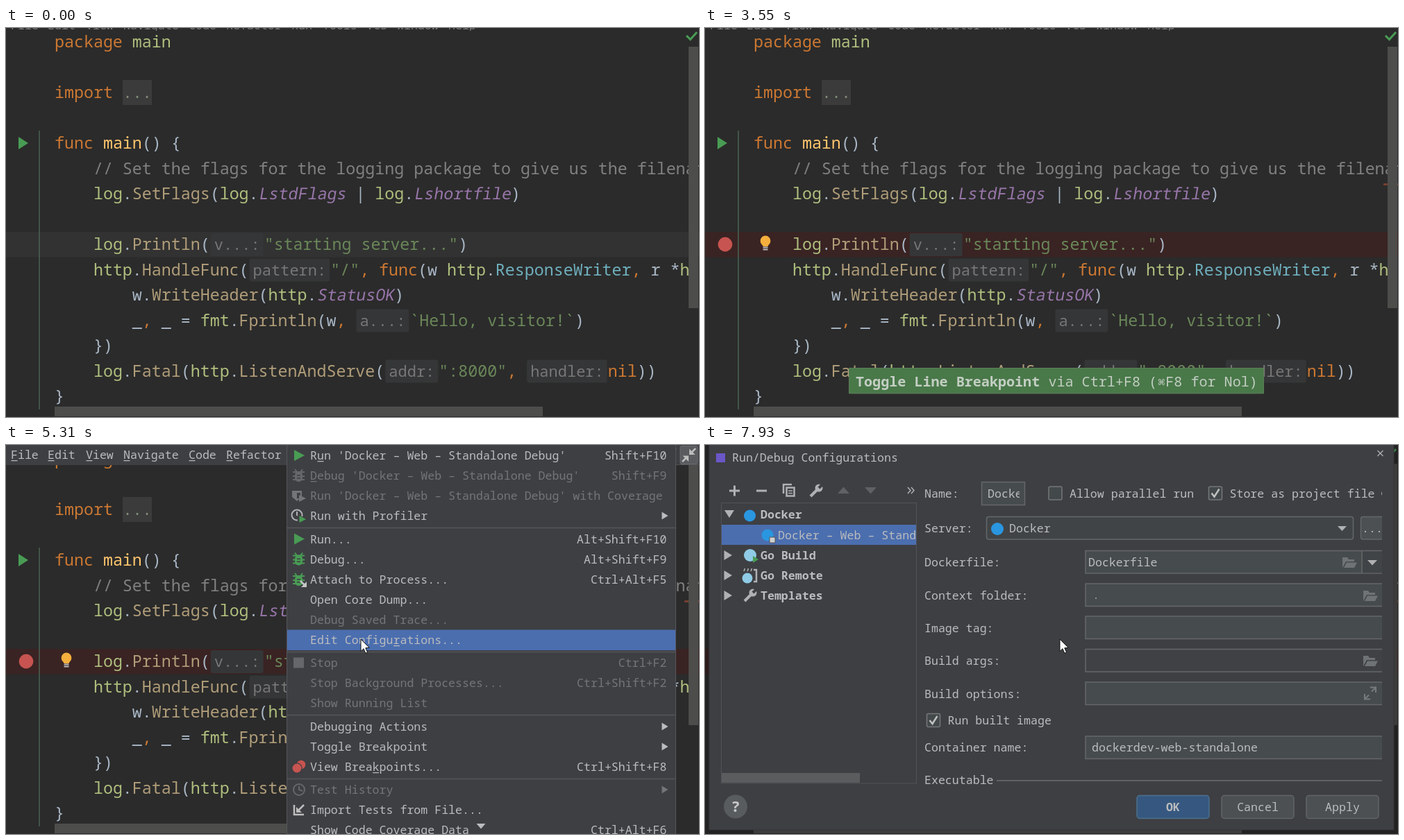
An HTML page with a canvas that plays this animation: 998 by 561 pixels, repeating every 8 s.

```html
<!DOCTYPE html>
<html lang="en">
<head>
<meta charset="utf-8">
<title>Editor breakpoint</title>
<style>
html, body { margin: 0; width: 100%; height: 100%; overflow: hidden; background: #2b2b2b; }
canvas { display: block; width: 998px; height: 561px; }
</style>
</head>
<body>
<canvas id="stage" width="998" height="561"></canvas>
<script>
const W = 998, H = 561, LOOP = 8000;
const g = document.getElementById('stage').getContext('2d');
const MONO = '"Noto Sans Mono", "DejaVu Sans Mono", monospace';
const PANEL = '#3e3f43', TEXT = '#bbbcbe', DIM = '#747579', BLUE = '#4b6eaf', GREEN = '#499c54';
const UI = 16.6, UI_ADV = UI * 0.6;
const CODE = 23.3, CODE_ADV = CODE * 0.6;
const HINT = 22, TIP = 20.1;

const clamp = v => Math.max(0, Math.min(1, v));
const span = (t, a, b) => clamp((t - a) / (b - a));
const ease = u => u * u * (3 - 2 * u);

function rect(x0, y0, x1, y1, fill, r = 0) {
  g.fillStyle = fill;
  g.beginPath();
  g.roundRect(x0, y0, x1 - x0, y1 - y0, r);
  g.fill();
}
function frame(x0, y0, x1, y1, fill, stroke, r = 0, lw = 1.5) {
  rect(x0, y0, x1, y1, fill, r);
  g.strokeStyle = stroke;
  g.lineWidth = lw;
  g.stroke();
}
function poly(color, ...p) {
  g.fillStyle = color;
  g.beginPath();
  for (let i = 0; i < p.length; i += 2) g.lineTo(p[i], p[i + 1]);
  g.closePath();
  g.fill();
}
function line(color, lw, ...p) {
  g.strokeStyle = color;
  g.lineWidth = lw;
  g.beginPath();
  for (let i = 0; i < p.length; i += 2) g.lineTo(p[i], p[i + 1]);
  g.stroke();
}
function disc(x, y, r, color) {
  g.fillStyle = color;
  g.beginPath();
  g.arc(x, y, r, 0, 7);
  g.fill();
}
function ring(x, y, r, color, lw = 2) {
  g.strokeStyle = color;
  g.lineWidth = lw;
  g.beginPath();
  g.arc(x, y, r, 0, 7);
  g.stroke();
}
function text(s, x, y, color = TEXT, size = UI, style = '', align = 'left') {
  g.font = `${style} ${size}px ${MONO}`;
  g.textAlign = align;
  g.fillStyle = color;
  g.fillText(s, x, y);
}
// The mono font has no italic, so lean it slightly.
function slanted(s, x, y, color, size) {
  g.save();
  g.transform(1, 0, -0.17, 1, x, y);
  text(s, 0, 0, color, size);
  g.restore();
}
function clipped(x0, y0, x1, y1, draw) {
  g.save();
  g.beginPath();
  g.rect(x0, y0, x1 - x0, y1 - y0);
  g.clip();
  draw();
  g.restore();
}

// ---- editor ----
const INK = {
  k: '#cc7832', d: '#ffc66d', p: '#afbf7e', f: '#b09d79', c: '#9876aa',
  s: '#6a8759', n: '#808080', t: '#6fafbd', o: '#a9b7c6'
};
// Each row: line number, indent in columns, then kind/text pairs; 'h' is an inlay hint.
const SOURCE = [
  [0, 0, 'k', 'package', 'p', ' main'],
  [2, 0, 'k', 'import'],
  [4, 0, 'k', 'func', 'd', ' main', 'o', '() {'],
  [5, 4, 'n', '// Set the flags for the logging package to give us the filename'],
  [6, 4, 'p', 'log', 'o', '.', 'f', 'SetFlags', 'o', '(', 'p', 'log', 'o', '.', 'c', 'LstdFlags',
    'o', ' | ', 'p', 'log', 'o', '.', 'c', 'Lshortfile', 'o', ')'],
  [8, 4, 'p', 'log', 'o', '.', 'f', 'Println', 'o', '(', 'h', 'v...:', 's', '"starting server..."', 'o', ')'],
  [9, 4, 'p', 'http', 'o', '.', 'f', 'HandleFunc', 'o', '(', 'h', 'pattern:', 's', '"/"', 'k', ', func',
    'o', '(w ', 'p', 'http', 'o', '.', 't', 'ResponseWriter', 'k', ',', 'o', ' r *', 'p', 'http'],
  [10, 8, 'o', 'w.', 'f', 'WriteHeader', 'o', '(', 'p', 'http', 'o', '.', 'c', 'StatusOK', 'o', ')'],
  [11, 8, 'o', '_', 'k', ',', 'o', ' _ = ', 'p', 'fmt', 'o', '.', 'f', 'Fprintln', 'o', '(w', 'k', ', ',
    'h', 'a...:', 's', '`Hello, visitor!`', 'o', ')'],
  [12, 4, 'o', '})'],
  [13, 4, 'p', 'log', 'o', '.', 'f', 'Fatal', 'o', '(', 'p', 'http', 'o', '.', 'f', 'ListenAndServe', 'o', '(',
    'h', 'addr:', 's', '":8000"', 'k', ', ', 'h', 'handler:', 'k', 'nil', 'o', '))'],
  [14, 0, 'o', '}']
];

function codeRow([n, indent, ...parts]) {
  let x = 70 + indent * CODE_ADV;
  const y = 28 + n * 36.5;
  for (let i = 0; i < parts.length; i += 2) {
    const kind = parts[i], s = parts[i + 1];
    if (kind === 'h') {
      const w = s.length * HINT * 0.6;
      rect(x + 1, y - 24, x + 11 + w, y + 9, '#353637', 3);
      text(s, x + 6, y, '#777', HINT);
      x += w + 12;
    } else {
      (kind === 'c' ? slanted : text)(s, x, y, INK[kind], CODE);
      x += s.length * CODE_ADV;
    }
  }
}

const CARET = [[30, 550], [1030, 1580], [1720, 2550], [3030, 3550], [4030, 4130]];

function bulb() {
  disc(87, 307, 7.4, '#f4af3d');
  poly('#f4af3d', 82, 311, 92, 311, 90.5, 315, 83.5, 315);
  rect(83.5, 315.5, 90.5, 317.5, '#b8b8b8');
  rect(83.5, 318.5, 90.5, 320.5, '#b8b8b8');
}

function editor(t) {
  const stopped = t >= 1720;
  rect(0, 0, W, H, '#2b2b2b');
  rect(0, 294, W, 330.5, stopped ? '#3a2323' : '#323232');
  line('#4b6553', 1.5, 48, 148, 48, 550);
  rect(168, 75, 210, 111, '#3b3b3b');
  text('...', 168, 101, '#848f7b', CODE);
  poly(GREEN, 18, 157, 32, 166, 18, 175);
  SOURCE.forEach(codeRow);
  if (stopped) {
    disc(29, 312, 10.4, '#c75450');
    rect(977, 224, W, 227, '#75402f');
  }
  if (t >= 2565) bulb();
  if (CARET.some(([a, b]) => t >= a && t < b)) rect(70, 297, 73, 327, '#c8c8c8');
  rect(983, 27, 997, 404, '#4d4d4b');
  rect(70, 546, 773, 560, '#4d4d4b');
  line('#499c54', 3, 980, 11, 985.5, 16.5, 995, 6);
  clipped(0, 0, 690, 4, () => menuLabels(2, '#7c7c7c'));
}

function tooltip(alpha) {
  if (!alpha) return;
  const x = 217, y = 516.5, adv = TIP * 0.6, ink = '#c3cec3';
  g.globalAlpha = alpha;
  frame(207.5, 490.5, 804.5, 527, '#497849', '#5c7d5a', 0, 1);
  text('Toggle Line Breakpoint', x, y, ink, TIP, 'bold');
  text('via Ctrl+F8 (', x + 23 * adv, y, ink, TIP);
  text('⌘', x + 36.5 * adv, y, ink, 17, '', 'center');
  text('F8 for Nol)', x + 37 * adv, y, ink, TIP);
  g.globalAlpha = 1;
}

// ---- menu bar ----
// label, x, underlined column
const MENUS = [['File', 7, 0], ['Edit', 60, 0], ['View', 115, 0], ['Navigate', 169, 0], ['Code', 263, 0],
  ['Refactor', 317, 0], ['Run', 411, 1], ['Tools', 456, 0], ['VCS', 519, 2], ['Window', 563, 0], ['Help', 637, 0]];

function menuLabels(y, color) {
  for (const [s, x] of MENUS) text(s, x, y, color);
}
function mnemonic(x, col, y, color) {
  rect(x + col * UI_ADV + 0.5, y + 2, x + (col + 1) * UI_ADV - 0.5, y + 3.2, color);
}

function clock() {
  g.save();
  g.transform(1, 0, -0.15, 1, 3, 0);
  const c = '#d2d2d2', two = x => line(c, 2, x, 5, x + 12, 5, x + 12, 14.5, x, 14.5, x, 24, x + 12, 24);
  disc(903, 6, 1.8, c);
  line(c, 2, 911, 5, 911, 25);
  two(917);
  disc(936, 11, 1.5, c);
  disc(936, 19, 1.5, c);
  two(942);
  line(c, 2, 962, 5, 962, 25);
  g.restore();
}

function menuBar(y, active) {
  if (y <= -30) return;
  g.save();
  g.translate(0, y);
  rect(0, 0, W, 29, PANEL);
  rect(684, 28, W, 29, '#505155');
  if (active) rect(404, 0, 448, 29, BLUE);
  menuLabels(20, TEXT);
  for (const [, x, col] of MENUS) mnemonic(x, col, 20, TEXT);
  clock();
  frame(971, 1.5, 996, 27.5, '#595b5e', '#6a6c6f', 2, 1);
  line('#bdbdbd', 2.5, 993, 5, 987, 11);
  line('#bdbdbd', 2.5, 974, 24, 980, 18);
  poly('#bdbdbd', 984, 5.5, 984, 14, 992.5, 14);
  poly('#bdbdbd', 974.5, 15.5, 983, 15.5, 983, 24);
  g.restore();
}

// ---- Run popup ----
function play(y, c = GREEN) { poly(c, 415, y - 8, 430, y, 415, y + 8); }
function bug(y, c = GREEN) {
  for (const d of [-5, 1, 6]) line(c, 2, 413, y + d, 430, y + d);
  line(c, 2, 416, y - 9, 419, y - 5);
  line(c, 2, 427, y - 9, 424, y - 5);
  rect(416, y - 6, 427, y + 9, c, 5.5);
  rect(419, y - 1, 424, y + 0.6, PANEL);
  rect(419, y + 3, 424, y + 4.6, PANEL);
}
function attach(y) {
  bug(y);
  line('#c4c4c4', 2.5, 424, y + 2, 432, y + 10);
  poly('#c4c4c4', 433, y + 3, 433, y + 11, 425, y + 11);
}
function shield(y) {
  poly(DIM, 412, y - 7, 426, y - 7, 426, y + 1, 419, y + 8, 412, y + 2);
  rect(419, y - 4, 424, y + 4, PANEL);
  poly(DIM, 422, y - 1, 432, y + 4, 422, y + 9);
}
function profiler(y) {
  ring(419, y - 1, 7.5, '#afb1b3');
  line('#afb1b3', 2, 419, y - 6, 419, y - 1, 423, y + 1);
  poly(PANEL, 420, y - 2, 434, y + 5, 420, y + 12);
  poly(GREEN, 422.5, y, 432, y + 5, 422.5, y + 10);
}
function stopBox(y) { rect(414, y - 7.5, 429, y + 7.5, '#66676a'); }
function points(y) {
  disc(425, y - 3, 6.3, '#c75450');
  ring(419, y + 2, 7, PANEL, 1.5);
  disc(419, y + 2, 6.5, '#c75450');
}
function history(y) {
  ring(422, y, 8, '#66676a');
  line('#66676a', 2, 422, y - 5, 422, y, 427, y + 2);
}
function importIcon(y) {
  line('#bdbdbd', 2.5, 415, y - 7, 415, y + 7, 429, y + 7);
  line('#bdbdbd', 2.5, 429, y - 7, 421, y + 1);
  poly('#bdbdbd', 418, y - 4, 418, y + 4, 426, y + 4);
}

const CFG = "'Docker – Web – Standalone Debug'";
// center y, label, shortcut ('>' opens a submenu), icon, disabled, underlined column
const ITEMS = [
  [15, 'Run ' + CFG, 'Shift+F10', play, 0, 1],
  [44, 'Debug ' + CFG, 'Shift+F9', bug, 1, 0],
  [73, 'Run ' + CFG + ' with Coverage', '', shield, 1],
  [102, 'Run with Profiler', '>', profiler],
  [135.5, 'Run...', 'Alt+Shift+F10', play],
  [164.5, 'Debug...', 'Alt+Shift+F9', bug],
  [194, 'Attach to Process...', 'Ctrl+Alt+F5', attach],
  [223, 'Open Core Dump...', ''],
  [252, 'Debug Saved Trace...', '', null, 1],
  [281, 'Edit Configurations...', '', null, 0, 12],
  [314, 'Stop', 'Ctrl+F2', stopBox, 1],
  [343, 'Stop Background Processes...', 'Ctrl+Shift+F2', null, 1],
  [372, 'Show Running List', '', null, 1],
  [406, 'Debugging Actions', '>'],
  [435, 'Toggle Breakpoint', '>'],
  [464, 'View Breakpoints...', 'Ctrl+Shift+F8', points, 0, 9],
  [497, 'Test History', '>', history, 1],
  [526, 'Import Tests from File...', '', importIcon],
  [555, 'Show Code Coverage Data', 'Ctrl+Alt+F6']
];

function popup(mouse) {
  frame(404.5, -2, 964.5, H + 2, PANEL, '#55565a', 0, 1);
  for (const y of [119.5, 298.5, 389.5, 481.5]) line('#55565a', 1.5, 405, y, 964, y);
  for (const [y, label, key, icon, off, col] of ITEMS) {
    const ink = off ? DIM : TEXT, base = y + 6;
    if (!off && mouse && mouse.x < 965 && Math.abs(mouse.y - y) < 14.5) rect(405, y - 14.5, 964, y + 15, BLUE);
    if (icon) icon(y, off ? '#66676a' : GREEN);
    text(label, 438, base, ink);
    if (col !== undefined) mnemonic(438, col, base, ink);
    if (key === '>') poly(ink, 944.5, y - 5.5, 953.5, y, 944.5, y + 5.5);
    else text(key, 951.5, base, ink, UI, '', 'right');
  }
  poly(TEXT, 677.5, 546, 690.5, 546, 684, 553.5);
}

// ---- dialog ----
const FIELD = '#464b4d', EDGE = '#646769', ICON = '#afb1b3';

function folder(x, y) {
  poly('#6f7375', x - 10, y + 8, x - 10, y - 7, x - 3, y - 7, x - 1, y - 4, x + 7, y - 4, x + 7, y - 1, x - 5, y - 1);
  poly('#6f7375', x - 4, y + 0.5, x + 11, y + 0.5, x + 7, y + 8, x - 8, y + 8);
}
function checkbox(x, y, label, on) {
  frame(x, y - 9.5, x + 19, y + 9.5, '#43494a', '#75777a', 2);
  if (on) line('#c0c0c0', 2.5, x + 4, y, x + 8, y + 5, x + 15, y - 6);
  text(label, x + 30, y + 6);
}
function wrench(x, y) {
  line(ICON, 4, x - 8, y + 8, x + 3, y - 3);
  disc(x + 4, y - 4, 5.5, ICON);
  line(PANEL, 4, x + 4, y - 4, x + 10, y - 10);
}
function button(x, label, main) {
  frame(x, 505.5, x + 104, 538.5, main ? '#365880' : '#4c5052', main ? '#4c708c' : '#626567', 4);
  text(label, x + 52, 528, TEXT, UI, main ? 'bold' : '', 'center');
}

function tree() {
  frame(23.5, 83.5, 304.5, 488, PANEL, '#525357', 0, 1);
  rect(24, 115, 304, 144, BLUE);
  poly(ICON, 28, 94, 42, 94, 35, 105);
  disc(64.5, 102, 8.5, '#2a96e0');
  text('Docker', 80, 106, TEXT, UI, 'bold');
  disc(90, 130, 8.5, '#2a96e0');
  frame(93, 133, 101, 141, '#d0d0d0', '#555', 0, 1);
  clipped(24, 115, 303.5, 144, () => text('Docker – Web – Standalone', 105, 136));
  [['Go Build', 159], ['Go Remote', 188], ['Templates', 217]].forEach(([s, y]) => {
    poly(ICON, 27.5, y - 7, 39, y, 27.5, y + 7);
    text(s, 80, y + 6, TEXT, UI, 'bold');
  });
  disc(65, 159, 9, '#8fcbe6');
  poly(GREEN, 69, 160, 77, 165, 69, 170);
  disc(61, 192, 7.5, '#8fcbe6');
  line(ICON, 2.5, 70, 180, 74, 180, 74, 197, 70, 197);
  for (const x of [56, 61, 66]) line(ICON, 1.5, x, 182, x + 1.5, 178);
  wrench(65, 217);
  rect(24, 473, 223, 487, '#5b5c5e');
}

function toolbar() {
  line(ICON, 3, 35, 66, 50, 66);
  line(ICON, 3, 42.5, 58.5, 42.5, 73.5);
  line(ICON, 3, 74, 66, 89, 66);
  line(ICON, 2.5, 113, 70, 113, 57, 125, 57);
  frame(117.5, 61.5, 128.5, 73.5, PANEL, ICON, 0, 2.5);
  line(ICON, 1.5, 120, 66, 126, 66);
  line(ICON, 1.5, 120, 69.5, 126, 69.5);
  wrench(160, 66);
  poly('#5f6164', 191, 70, 208, 70, 199.5, 60.5);
  poly('#5f6164', 230, 61, 247, 61, 238.5, 70.5);
  for (const x of [292, 297]) line(ICON, 1.5, x, 61, x + 4, 65.5, x, 70);
}

function form() {
  [['Name:', 70], ['Server:', 120], ['Dockerfile:', 169], ['Context folder:', 216.5], ['Image tag:', 264],
    ['Build args:', 311], ['Build options:', 358.5], ['Container name:', 436], ['Executable', 483]]
    .forEach(([s, y]) => text(s, 316, y + 6));
  frame(398.5, 53.5, 460.5, 86.5, FIELD, EDGE);
  clipped(400, 54, 453, 86, () => text('Docker', 407, 76));
  checkbox(495, 69.5, 'Allow parallel run');
  checkbox(725.5, 69.5, 'Store as project file', true);
  line('#5f6164', 2, 420, 484, 975, 484);
  clipped(300, 50, 975, 490, () => {
    frame(405.5, 103.5, 933.5, 136, '#414447', EDGE, 3);
    disc(421, 121, 9, '#2a96e0');
    text('Docker', 438, 126);
    poly(ICON, 911, 117, 924, 117, 917.5, 124);
    frame(944.5, 103.5, 980, 136, '#4c5052', EDGE, 3);
    text('...', 946, 126);
    for (const y of [152.5, 200, 247, 294.5, 342, 420])
      frame(548, y, 985, y + 32.5, y === 294.5 ? '#404145' : FIELD, EDGE);
    line(EDGE, 1.5, 946, 153, 946, 185);
    rect(947, 153.5, 975, 184.3, '#414447');
    poly(ICON, 954, 166, 968, 166, 961, 173.5);
    text('Dockerfile', 552, 175);
    text('.', 558, 222, '#999');
    text('dockerdev-web-standalone', 557, 442);
    folder(928, 169);
    folder(958, 217);
    folder(958, 311);
    line('#777b7d', 2, 958, 349.5, 966, 349.5, 966, 357);
    line('#777b7d', 2, 966, 349.5, 960, 355.5);
    line('#777b7d', 2, 950, 359, 950, 366.5, 958, 366.5);
    line('#777b7d', 2, 950, 366.5, 956, 360.5);
    disc(979, 70, 5, ICON);
  });
  checkbox(319.5, 397, 'Run built image', true);
}

function dialog() {
  rect(0, 0, W, H, 'rgba(0,0,0,.22)');
  frame(6, -2, 992, 555, PANEL, '#34353a', 0, 1);
  rect(16, 12, 29, 25, '#6b57c8');
  text('Run/Debug Configurations', 39, 24);
  line(ICON, 1.3, 968.5, 8, 976.5, 16);
  line(ICON, 1.3, 976.5, 8, 968.5, 16);
  toolbar();
  tree();
  form();
  disc(44, 521.5, 17, '#595c5f');
  text('?', 44, 529, '#c8c8c8', 22, 'bold', 'center');
  button(622, 'OK', true);
  button(744, 'Cancel');
  button(866, 'Apply');
}

// ---- pointer ----
function pointer(t) {
  if (t < 4240) return null;
  if (t < 4860) {
    const u = span(t, 4240, 4860);
    return { x: 1000 - 17 * u, y: 40 + 160 * u };
  }
  const u = Math.sin(span(t, 4860, 5310) * Math.PI / 2), v = 1 - u;
  const bez = (a, b, c) => a * v * v + 2 * b * u * v + c * u * u;
  return { x: bez(983, 900, 511), y: bez(200, 455, 280) };
}
function arrow({ x, y }) {
  g.save();
  g.translate(x, y);
  poly('#fff', 0, 0, 0, 17.5, 4, 13.7, 6.8, 20.3, 9.6, 19.1, 6.8, 12.7, 12.2, 12.3);
  g.strokeStyle = '#111';
  g.lineWidth = 1;
  g.stroke();
  g.restore();
}

function draw(t) {
  const mouse = pointer(t);
  editor(t);
  tooltip(span(t, 1690, 1855) * (1 - span(t, 4030, 4170)));
  const shown = ease(span(t, 4010, 4150)) * (1 - ease(span(t, 7580, 7760)));
  menuBar(-30 + 30 * shown, t >= 4165 && t < 7580);
  if (t >= 4165 && t < 7480) popup(mouse);
  if (t >= 7790) dialog();
  if (mouse) arrow(mouse);
}

const start = performance.now();
function tick() {
  draw((performance.now() - start) % LOOP);
  requestAnimationFrame(tick);
}
tick();
</script>
</body>
</html>
```
